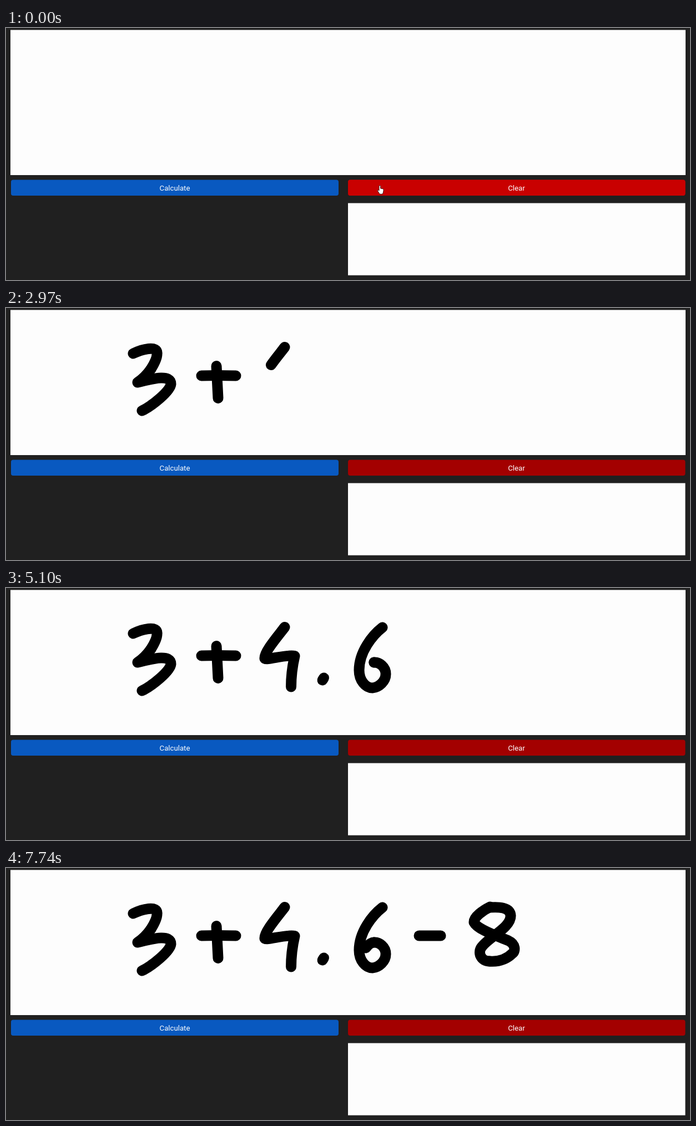
Write an HTML page that moves like this. It is 1232x454 px and loops after 8000 ms.

```html
<!DOCTYPE html>
<html lang="en">
<head>
<meta charset="utf-8">
<title>Handwriting calculator</title>
<style>
  html, body { margin: 0; width: 100%; height: 100%; overflow: hidden; background: #202020; }
  svg { display: block; width: 100%; height: 100%; }
  text { font: 13.2px Roboto, sans-serif; fill: #fff; text-anchor: middle; }
  #ink { fill: none; stroke: #000; stroke-width: 19; stroke-linecap: round; stroke-linejoin: round; }
</style>
</head>
<body>
<svg viewBox="0 0 1232 454">
  <rect width="1232" height="454" fill="#202020"/>
  <rect x="8" y="3.5" width="1216" height="261.5" fill="#fdfdfd"/>
  <rect x="616" y="315.5" width="607.5" height="130" fill="#fdfdfd"/>
  <rect x="9" y="273.5" width="590" height="28.5" rx="4" fill="#0959c0"/>
  <rect x="616" y="273.5" width="607.5" height="28.5" rx="4" fill="#a30000"/>
  <rect id="hover" x="616" y="273.5" width="607.5" height="28.5" rx="4" fill="#c90000"/>
  <text x="304" y="293">Calculate</text>
  <text x="919.5" y="293">Clear</text>
  <g id="ink"></g>
  <path id="hand" fill="#fff" stroke="#200" stroke-width=".8" stroke-linejoin="round"
    d="M672 284.5q1.4-1.5 2.6 0v4.5l4 .8q1.6.5 1.5 2l-.6 4-1.3 3.4h-5l-3.700-5.600q-.5-2 1.200-1.500l1.300 1z"/>
</svg>
<script>
const LOOP = 8000;

// Pen strokes: start ms, end ms, path
const strokes = [
  [560, 830, "M229 82C244 75 274 66 272 83C272 92 266 102 261 110"],
  [830, 1350, "M261 110C254 120 246 128 237 134C262 128 297 118 297 137C296 150 262 177 245 185"],
  [1600, 1900, "M352 122L380 121.5"],
  [1900, 2270, "M380 121.5L414 122"],
  [2430, 2600, "M379 104.5L382 162.5"],
  [2770, 3660, "M502 70.5C492 84 464 116 466 127C468 131 506 119 520 122.5C516 140 513.5 158 513.5 178"],
  [3930, 4030, "M572.5 162L570 166"],
  [4400, 5100, "M678 71C660 85 636 115 636 148C636 167 648 180 660 180C672 179 684 168 684 155C684 142 672 133 663 134"],
  [5100, 5200, "M663 134C657 134 652 139 648 144"],
  [5400, 5740, "M744 122L783 122"],
  [5970, 6640, "M872 70C860 76 842 88 843 98C850 112 890 124 905 131C918 137 918 150 912 154C900 166 885 169 871 168"],
  [6640, 7200, "M871 168C855 168 849 152 857 142C870 124 909 108 909 86C908 70 886 70 872 71"]
].map(([start, end, d]) => {
  const path = document.createElementNS("http://www.w3.org/2000/svg", "path");
  path.setAttribute("d", d);
  document.getElementById("ink").append(path);
  return { start, end, path, length: path.getTotalLength() };
});

const hover = document.getElementById("hover");
const hand = document.getElementById("hand");
const progress = (t, start, end) => Math.min(1, Math.max(0, (t - start) / (end - start)));

function draw(t) {
  for (const { start, end, path, length } of strokes) {
    const drawn = Math.max(0.01, progress(t, start, end) * length);
    path.style.display = t < start ? "none" : "";
    path.style.strokeDasharray = t < end ? `${drawn} ${length + 50}` : "none";
  }
  hover.style.opacity = 1 - progress(t, 530, 650);
  hand.style.display = t < 530 ? "" : "none";
  hand.setAttribute("transform", `translate(0 ${t < 300 ? 0 : t < 330 ? 2 : 4})`);
}

const origin = performance.now();
function tick() {
  draw((performance.now() - origin) % LOOP);
  requestAnimationFrame(tick);
}
tick();
</script>
</body>
</html>
```
